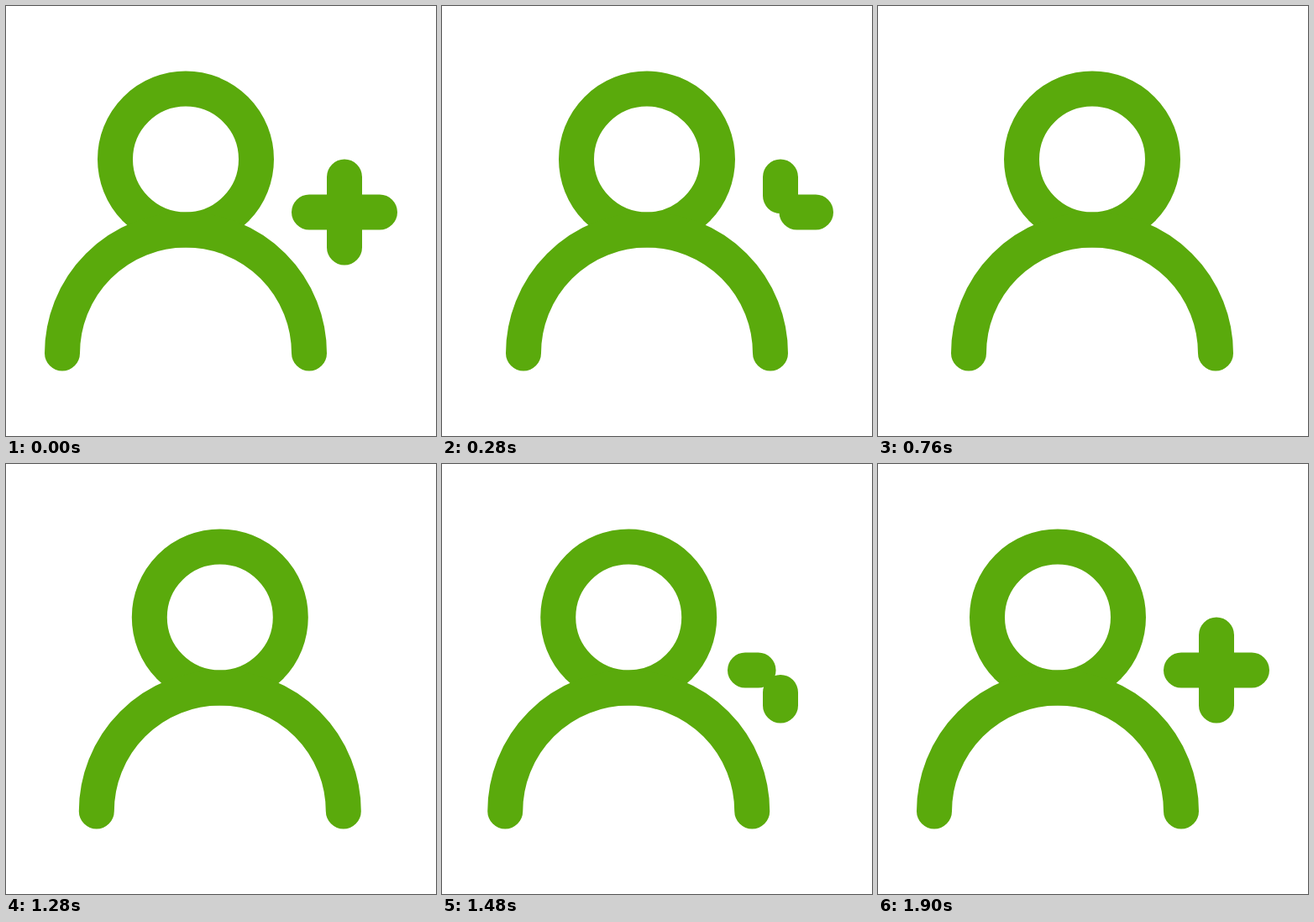
These frames come from a looping animation (512x512 px, 3760 ms). An HTML page:

```html
<!DOCTYPE html>
<html lang="en">
<head>
<meta charset="utf-8">
<title>Add user</title>
<style>
  html, body { margin: 0; width: 100%; height: 100%; overflow: hidden; background: #fff; }
  svg { display: block; width: 100%; height: 100%; }
</style>
</head>
<body>
<svg viewBox="0 0 512 512" fill="none" stroke="#5aaa0c" stroke-width="42" stroke-linecap="round">
  <g id="person">
    <circle cx="214" cy="182.5" r="84"/>
    <path d="M67 413.5a147 147 0 0 1 294 0"/>
  </g>
  <path id="plus"/>
</svg>
<script>
const LOOP = 3760, SHIFT = 41, ARM = 84;
const LEFT = 361, RIGHT = LEFT + ARM, TOP = 203.5, BOTTOM = TOP + ARM;
const person = document.getElementById('person');
const plus = document.getElementById('plus');

// cubic-bezier(.36, 0, 0, 1), solved by bisection
function ease(x) {
  if (x <= 0) return 0;
  if (x >= 1) return 1;
  let lo = 0, hi = 1;
  for (let i = 0; i < 24; i++) {
    const s = (lo + hi) / 2;
    if (1.08 * s * (1 - s) ** 2 + s ** 3 < x) lo = s; else hi = s;
  }
  return lo * lo * (3 - 2 * lo);
}

const progress = (t, start, length) => ease((t - start) / length);

function plusPath(t) {
  // Retract towards the top and right ends
  if (t < 540) {
    const cut = ARM * progress(t, 0, 760);
    return `M${RIGHT} 245.5H${LEFT + cut}M403 ${TOP}V${BOTTOM - cut}`;
  }
  // Grow back from the left and bottom ends
  const size = ARM * progress(t, 1389, 520);
  return size ? `M${LEFT} 245.5h${size}M403 ${BOTTOM}v${-size}` : '';
}

function draw(now) {
  const t = now % LOOP;
  const x = SHIFT * (progress(t, 0, 760) - progress(t, 1260, 520));
  person.setAttribute('transform', `translate(${x} 0)`);
  plus.setAttribute('d', plusPath(t));
}

const start = performance.now();
function tick() {
  draw(performance.now() - start);
  requestAnimationFrame(tick);
}
tick();
</script>
</body>
</html>
```
